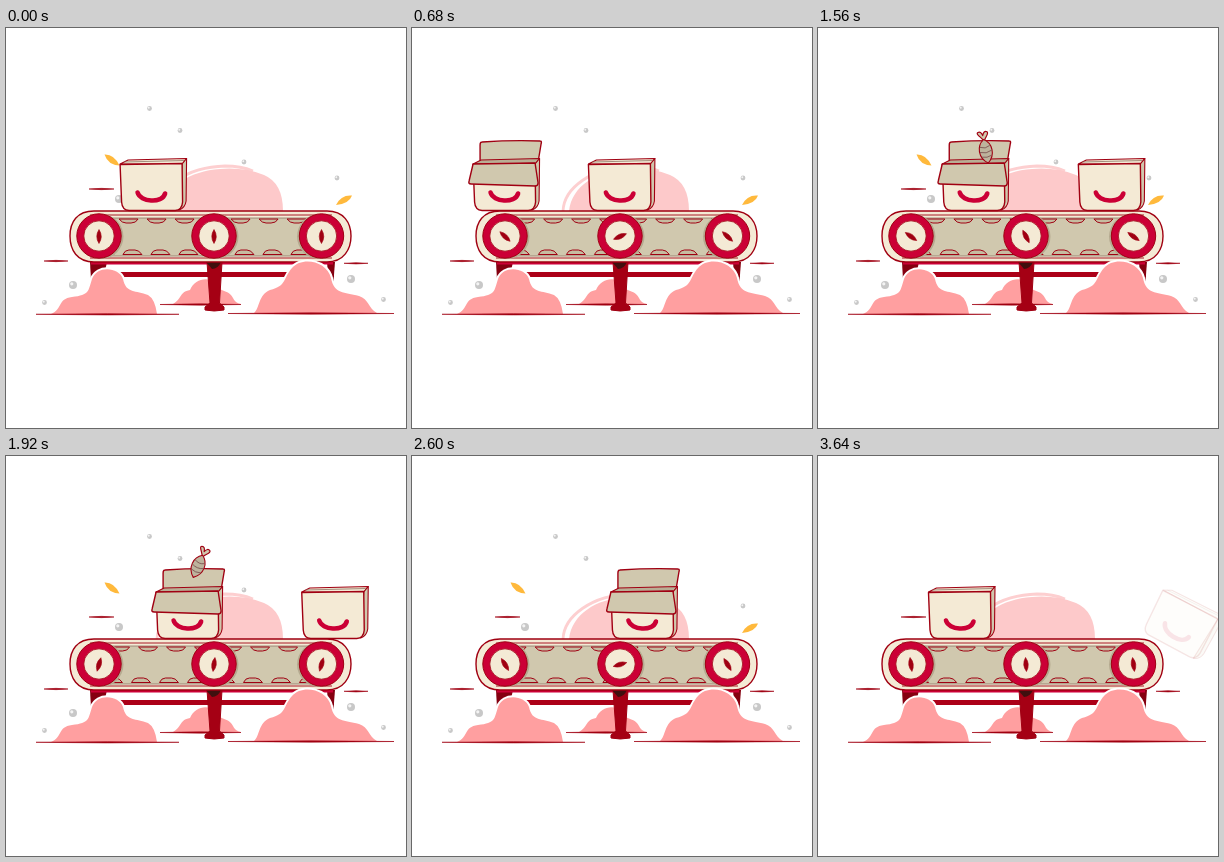
Write an HTML page with a canvas that moves like this. It is 400 px wide and 400 px high and loops after 3680 ms.

```html
<!DOCTYPE html>
<html lang="en">
<head>
<meta charset="utf-8">
<title>Conveyor belt</title>
<style>
html, body { margin: 0; height: 100%; overflow: hidden; background: #fff; }
canvas { display: block; width: 400px; height: 400px; }
</style>
</head>
<body>
<canvas width="400" height="400"></canvas>
<script>
const ctx = document.querySelector('canvas').getContext('2d');
const LOOP = 3680;
const INK = '#a00012', RED = '#cb0036', CREAM = '#f4ead5', TAN = '#d0c8ae', PINK = '#ff9fa0';
const START_X = 23, DROP_X = 331;

const ramp = (t, from, to, max = 1) => Math.min(max, Math.max(0, (t - from) / (to - from)));
const mix = (a, b, p) => a + (b - a) * p;

function shape(d, fill, stroke, width = 1.4) {
  const path = new Path2D(d);
  if (fill) { ctx.fillStyle = fill; ctx.fill(path); }
  if (stroke) { ctx.strokeStyle = stroke; ctx.lineWidth = width; ctx.stroke(path); }
}

function disc(x, y, r, fill, stroke, width) {
  shape(`M${x - r} ${y}a${r} ${r} 0 1 1 ${2 * r} 0a${r} ${r} 0 1 1 ${-2 * r} 0`, fill, stroke, width);
}

function bubble(x, y, r) {
  disc(x, y, r, '#c8c8c8');
  disc(x - r * .3, y - r * .3, r * .4, '#f4f4f4');
}

function dash(x1, x2, y, h = 1.3) {
  const m = (x1 + x2) / 2;
  shape(`M${x1} ${y}Q${m} ${y - h} ${x2} ${y}Q${m} ${y + h} ${x1} ${y}`, INK, INK, .6);
}

function layer(x, y, angle, draw, scaleY = 1) {
  ctx.save();
  ctx.translate(x, y);
  ctx.rotate(angle);
  ctx.scale(1, scaleY);
  draw();
  ctx.restore();
}

function backdrop(alpha) {
  shape('M151 183C152 160 180 139 219 138Q235 138 247 143', null, '#fdcfd0', 2.8);
  shape('M157 183C160 158 184 143 214 141Q238 139 258 147Q277 155 277 183Z', '#fdc9ca');
  dash(83, 108, 161);
  ctx.globalAlpha = alpha;
  for (const [x, y] of [[143.5, 80.5], [174, 102.5], [238, 134], [331, 150], [38.5, 274.5], [377.5, 271.5]]) bubble(x, y, 2.4);
  for (const [x, y] of [[113, 171], [67, 257], [345, 251]]) bubble(x, y, 4);
  shape('M98.5 126.5Q108 126 113.5 137.5Q102 137 98.5 126.5', '#ffb93c');
  shape('M330 177Q335 166.500 346 167.500Q343 176 330 177', '#ffb93c');
  ctx.globalAlpha = 1;
}

function frame() {
  shape('M167 276C176 271 173 264 184 262C189 250 203 248 211 256C213 265 223 261 227 270Q229 275 235 276Z', PINK);
  dash(154, 235, 276.5);
  shape('M85 244H328V249H85Z', '#ac0018');
  shape('M84 234H101L97 252H85Z', '#850010');
  shape('M321 234H329L327 259H323Z', '#850010');
  shape('M85 234.5H327', null, RED, 4);
  shape('M201 234H216L213.5 275L218 279V282Q208 284 199 282V279L204 275Z', '#a50014', INK, 1);
  shape('M200 234H215Q212 241 206 241Z', '#40100f');
}

function wheel(x, angle) {
  disc(x + (x > 300 ? -2 : 2), 208.5, 22.5, '#b5aa90');
  disc(x, 208, 22.2, RED, INK, 1);
  disc(x, 208, 15.2, CREAM, INK, .8);
  layer(x, 208.5, angle, () => shape('M0 -7Q4.5 0 0 7Q-4.5 0 0 -7', INK, INK, .6));
}

function belt(p) {
  shape('M88 183H321C338 183 345 195 345 208S338 234 321 234H88C71 234 64 222 64 208S71 183 88 183Z', CREAM, INK);
  shape('M84 187H326M84 230H326', null, INK, .9);
  const track = 'M95 190H314V228H95Z', gap = 28, shift = p * 9 % 1 * gap;
  shape(track, TAN, '#8f7565', .8);
  ctx.save();
  ctx.clip(new Path2D(track));
  for (let x = 66; x < 350; x += gap) {
    shape(`M${x + shift - 9} 191q3 4 7 4h5q5 0 7 -4z`, '#c6bca1', INK, 1);
    shape(`M${x + 23 - shift} 226.5q2 -4.500 6 -4.500h6q4 0 7 4.500z`, '#c6bca1', INK, 1);
  }
  ctx.restore();
  const turn = p * 2 * Math.PI;
  wheel(93, 2 * turn);
  wheel(208, turn);
  wheel(315.5, 2 * turn);
}

function foreground() {
  const mounds = [
    'M45 286C57 281 51 271 66 269C84 267 82 263 86 251C91 237 113 239 117 251C120 266 130 262 142 267Q149 271 151 286Z',
    'M248 285C254 280 252 267 264 262C281 258 277 250 286 240C296 228 321 233 325 250C328 266 338 264 353 268C363 271 362 280 371 285Z'
  ];
  for (const d of mounds) shape(d, PINK, '#fff', 4);
  for (const d of mounds) shape(d, PINK);
  dash(30, 173, 286.3);
  dash(222, 388, 285.5);
  dash(38, 62, 233);
  dash(338, 362, 235.3);
}

function fish(x, y, angle) {
  layer(x, y, angle, () => {
    shape('M0 -8C-2 -12 -7 -16 -4 -17Q-1 -18 0 -13Q2 -18 5 -16C7 -14 2 -11 1 -8', TAN, INK, 1.2);
    shape('M0 -9C8 -4 9 8 0 15C-9 8 -8 -4 0 -9Z', '#bdb39c', INK, 1.1);
    shape('M-5 -2Q0 1 5 -2M-6 3Q0 6 6 3M-5 8Q0 10 5 8', null, '#7b5350', .8);
  });
}

// Three fish drop in at equal intervals, hidden once below the rim.
function fishes(t) {
  ctx.save();
  ctx.beginPath();
  ctx.rect(-20, 0, 120, 136);
  ctx.clip();
  for (let i = 0; i < 3; i++) {
    const age = t - 1004 - 379 * i, y = 57 + .002 * age * age;
    if (age > 0 && y < 155) fish(43, y, .6 * i - .8);
  }
  ctx.restore();
}

function box(flaps, t) {
  layer(0, 134, 0, () =>
    shape('M9 -20Q39 -22 67 -21Q69 -21 68 -18L65 0L7 -1L7 -17Q7 -20 9 -20Z', TAN, flaps && INK), flaps);
  shape('M0 136L8 132L66.5 130.5L62 136Z', flaps ? '#b9ae95' : CREAM, INK, 1.1);
  if (flaps) fishes(t);
  else shape('M4 134L64 132.5', null, '#8f7565', .8);
  shape('M62 136L66.5 130.5L66 173Q65 180 59 182Z', TAN, INK, 1.1);
  shape('M0 136.5L62 135.5L62.5 174Q62 182 55 182.5H9Q2 182 1.5 174Z', CREAM, INK);
  layer(0, 135, 0, () =>
    shape('M0 1L62 0L65 20Q65 23 62 23L-2 21Q-5 21 -4 18Z', TAN, flaps && INK), flaps);
  ctx.lineCap = 'round';
  shape('M17.5 164.5C20 174 42 176 45 165.5', null, RED, 4.6);
  ctx.lineCap = 'butt';
}

// Tips onto the belt until `land`, glides along, tips off after `leave`.
function ride(t, glideX, land, leave, flaps = 0) {
  const arrive = ramp(t, land, land - 400), depart = ramp(t, leave, leave + 260, 1.11);
  const x = mix(mix(glideX, START_X, arrive), DROP_X, depart);
  const angle = (28 * depart - 37 * arrive) * Math.PI / 180;
  ctx.globalAlpha = Math.min(1, 5 * (1 - arrive)) * Math.max(0, 1 - .9 * depart);
  layer(x + 33, 157 + 6 * arrive + 11 * depart, angle, () => {
    ctx.translate(-33, -157);
    box(flaps, t);
  });
  ctx.globalAlpha = 1;
}

function render(t) {
  ctx.fillStyle = '#fff';
  ctx.fillRect(0, 0, 400, 400);
  ctx.lineJoin = 'round';
  backdrop(1 - ramp(t, 2960, 3420));
  frame();
  belt(t / LOOP);
  foreground();
  for (const u of [t, t - LOOP]) ride(u, 114 + .09 * u + 2.4e-6 * u * u, -320, 2060);
  ride(t, 61 + .0718 * (t - 680), 420, 3380, ramp(t, 380, 560) - ramp(t, 3160, 3340));
}

const begin = performance.now();
function tick() {
  render((performance.now() - begin) % LOOP);
  requestAnimationFrame(tick);
}
tick();
</script>
</body>
</html>
```
